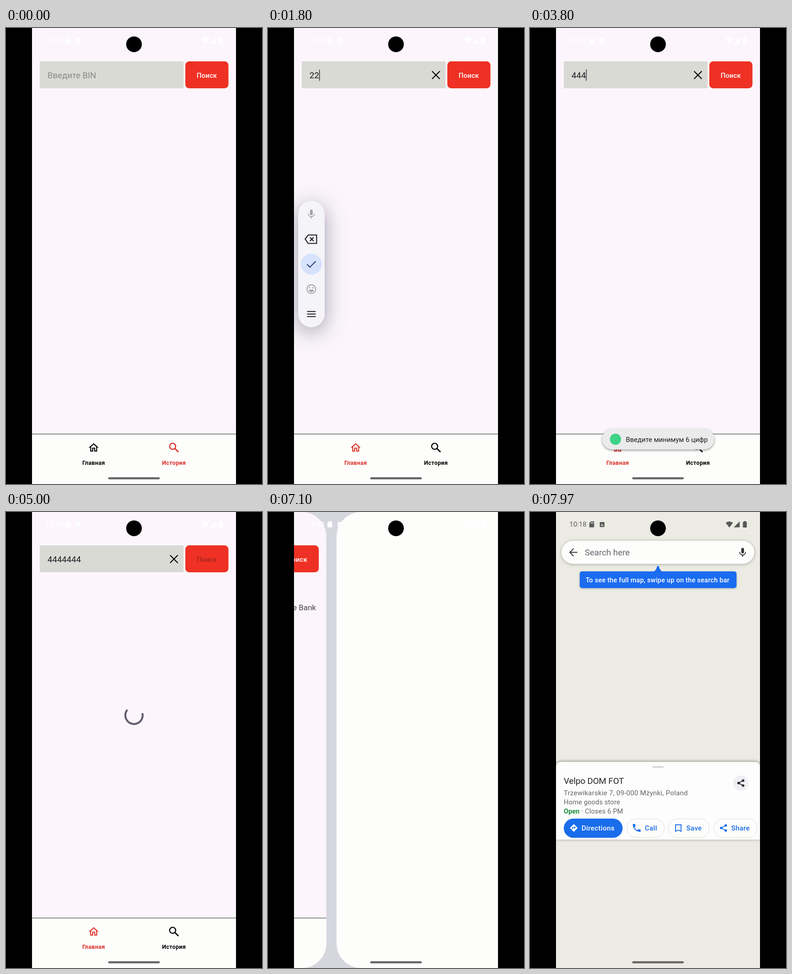
These frames come from a looping animation (561x998 px, 8000 ms). An HTML page with a canvas:

```html
<!DOCTYPE html>
<html lang="ru">
<head>
<meta charset="utf-8">
<style>
html, body { margin: 0; width: 100%; height: 100%; overflow: hidden; background: #000; }
canvas { display: block; width: 100vw; height: 100vh; }
</style>
</head>
<body>
<canvas id="stage" width="561" height="998"></canvas>
<script>
const c = document.getElementById('stage').getContext('2d');
const LOOP = 8000;
const SCREEN = { x: 57, w: 447, h: 998 };
const RED = '#ee3124', TAB_RED = '#dc3029', BLUE = '#1a6dea', INK = '#45424b';

const T = {
  homeTab: 600, toolbarIn: 950, firstDigit: 1300, secondDigit: 1550,
  toastIn: 2300, toastOut: 4300, clear: 3200, typeStart: 3450, typeStep: 140,
  load: 4650, result: 5650, slide: 6967, mapIn: 7480, sheetIn: 7680
};

const clamp = v => Math.max(0, Math.min(1, v));

// Cubic bezier segment evaluated at x by bisection.
function bezier(x, [x0, y0, x1, y1, x2, y2, x3, y3]) {
  const at = (a, b, d, e, s) =>
    a * (1 - s) ** 3 + 3 * b * s * (1 - s) ** 2 + 3 * d * s * s * (1 - s) + e * s ** 3;
  let lo = 0, hi = 1;
  for (let i = 0; i < 24; i++) {
    const mid = (lo + hi) / 2;
    if (at(x0, x1, x2, x3, mid) < x) lo = mid; else hi = mid;
  }
  return at(y0, y1, y2, y3, lo);
}
const standard = x => bezier(clamp(x), [0, 0, 0.4, 0, 0.2, 1, 1, 1]);
function emphasized(x) {
  if (x <= 0) return 0;
  if (x >= 1) return 1;
  return x < 1 / 6
    ? bezier(x, [0, 0, 0.05, 0, 0.1333, 0.06, 1 / 6, 0.4])
    : bezier(x, [1 / 6, 0.4, 0.2083, 0.82, 0.25, 1, 1, 1]);
}

function text(str, x, y, size, color, { weight = 400, spacing = 0, align = 'left' } = {}) {
  c.font = `${weight} ${size}px Roboto, sans-serif`;
  c.letterSpacing = spacing + 'px';
  c.textAlign = align;
  c.fillStyle = color;
  c.fillText(str, x, y);
}
function rect(x, y, w, h, color) {
  c.fillStyle = color;
  c.fillRect(x, y, w, h);
}
function round(x, y, w, h, r, color, border) {
  c.beginPath();
  c.roundRect(x, y, w, h, r);
  c.fillStyle = color;
  c.fill();
  if (border) {
    c.strokeStyle = border;
    c.lineWidth = 1;
    c.stroke();
  }
}
function circle(x, y, r, color) {
  c.beginPath();
  c.arc(x, y, r, 0, Math.PI * 2);
  c.fillStyle = color;
  c.fill();
}
function ring(x, y, r, color, width, from = 0, sweep = Math.PI * 2) {
  c.beginPath();
  c.arc(x, y, r, from, from + sweep);
  c.strokeStyle = color;
  c.lineWidth = width;
  c.stroke();
}
function line(points, color, width, close = false) {
  c.beginPath();
  points.forEach(([x, y]) => c.lineTo(x, y));
  if (close) c.closePath();
  c.strokeStyle = color;
  c.lineWidth = width;
  c.stroke();
}
function poly(points, color) {
  c.beginPath();
  points.forEach(([x, y]) => c.lineTo(x, y));
  c.fillStyle = color;
  c.fill();
}
function shape(d, x, y, scale, color) {
  c.save();
  c.translate(x, y);
  c.scale(scale, scale);
  c.fillStyle = color;
  c.fill(new Path2D(d));
  c.restore();
}
function shadowed(color, blur, dy, draw) {
  c.save();
  c.shadowColor = color;
  c.shadowBlur = blur;
  c.shadowOffsetY = dy;
  draw();
  c.restore();
}

const HOME = 'M12 5.69l5 4.5V18h-2v-6H9v6H7v-7.81l5-4.5M12 3L2 12h3v8h6v-6h2v6h6v-8h3z';
const PHONE = 'M6.6 10.8c1.4 2.8 3.8 5.1 6.6 6.6l2.2-2.2c.3-.3.7-.4 1-.2 1.1.4 2.3.6 3.6.6.6 0 1 .4 1 1V20c0 .6-.4 1-1 1C10.6 21 3 13.4 3 4c0-.6.4-1 1-1h3.5c.6 0 1 .4 1 1 0 1.2.2 2.4.6 3.6.1.3 0 .7-.2 1z';

function mic(x, y, color) {
  round(x - 3, y - 10, 6, 12, 3, color);
  ring(x, y - 1, 6.5, color, 1.9, 0, Math.PI);
  rect(x - 1, y + 5, 2, 4.5, color);
}
function share(x, y, color) {
  line([[x + 5, y - 5.5], [x - 5, y], [x + 5, y + 5.5]], color, 1.7);
  for (const [dx, dy] of [[5, -5.5], [-5, 0], [5, 5.5]]) circle(x + dx, y + dy, 2.7, color);
}
function magnifier(x, y, color) {
  ring(x - 2.8, y - 3, 6.6, color, 2.4);
  line([[x + 2, y + 1.8], [x + 10, y + 9.6]], color, 2.8);
}

function field(value, cursor) {
  rect(74, 73, 315, 59, '#d9dad4');
  if (value) {
    text(value, 91, 110, 18.6, '#1d1b20');
    line([[359.5, 94.5], [376.5, 111.5]], '#0a0a0a', 2.3);
    line([[376.5, 94.5], [359.5, 111.5]], '#0a0a0a', 2.3);
  } else {
    text('Введите BIN', 91, 110, 18.6, '#8b8c8a');
  }
  if (cursor) rect(91 + value.length * 10.44, 91, 2, 24.5, '#55555a');
}

function tabs(homeActive) {
  rect(57, 888, 447, 110, '#fdfdfb');
  rect(57, 888, 447, 1.2, '#48474a');
  const home = homeActive ? TAB_RED : '#000';
  const history = homeActive ? '#000' : TAB_RED;
  const style = { weight: 700, spacing: 0.3, align: 'center' };
  shape(HOME, 179, 905.3, 1.09, home);
  magnifier(368, 918.5, history);
  text('Главная', 192, 956, 12.6, home, style);
  text('История', 368, 956, 12.6, history, style);
}

function toolbar() {
  shadowed('rgba(70,70,95,.5)', 46, 10, () => round(66, 378, 58, 277, 29, '#f5f4f8'));
  const gray = '#a3a2aa', dark = '#1c1c22';
  mic(95, 407.5, gray);
  line([[81.5, 462], [88, 453], [106.5, 453], [106.5, 471.5], [88, 471.5]], dark, 2.2, true);
  line([[92, 458], [100, 466.5]], dark, 2.2);
  line([[100, 458], [92, 466.5]], dark, 2.2);
  circle(95, 517, 23, '#d6e2fc');
  line([[85.5, 517], [92, 523.5], [104.5, 510.5]], '#2a4379', 2.2);
  ring(95, 571.5, 9.6, gray, 2);
  circle(91.3, 568.5, 1.6, gray);
  circle(98.7, 568.5, 1.6, gray);
  c.beginPath();
  c.arc(95, 572.8, 5.2, 0, Math.PI);
  c.fillStyle = gray;
  c.fill();
  for (const y of [620.5, 626, 631.5]) rect(85.5, y - 1, 19, 2, dark);
}

function toast(alpha) {
  c.save();
  c.globalAlpha = alpha;
  shadowed('rgba(0,0,0,.4)', 5, 2, () => round(158, 877, 246, 45.5, 22.75, '#ebebec'));
  circle(187.3, 900, 12.2, '#3ed386');
  text('Введите минимум 6 цифр', 210, 905.5, 14.9, '#1f1f21');
  c.restore();
}

function spinner(ms) {
  const rad = Math.PI / 180, cycle = ms % 1332;
  const head = 290 * standard(cycle / 666);
  const tail = 290 * standard((cycle - 666) / 666);
  const turn = 286 * cycle / 1332 + 216 * Math.floor(ms / 1332) - 90;
  ring(280.5, 445, 19, '#625b71', 4.2, (turn + tail) * rad, Math.max(0.5, head - tail) * rad);
}

function results() {
  const bold = { weight: 700 };
  text('Тип карты:', 74, 184, 17, INK, bold);
  text('nira', 74, 215, 17, INK);
  text('Страна:', 74, 271, 17, INK, bold);
  text('Poland', 74, 302, 17, INK);
  text('(широта: 52.0, долгота:', 74, 333, 17, INK);
  text('20.0)', 74, 353, 17, INK);
  text('Банк:', 323, 184, 17, INK, bold);
  text('Sorvel Lunarine Bank', 323, 215, 17, INK);
  text('Tamira S.A.', 323, 235, 17, INK);
  text('-', 323, 266, 17, INK);
  text('-', 323, 297, 17, INK);
}

function typed(t) {
  if (t < T.clear) return '2'.repeat((t >= T.firstDigit) + (t >= T.secondDigit));
  const n = Math.floor((t - T.typeStart) / T.typeStep) + 1;
  return '4'.repeat(Math.max(0, Math.min(7, n)));
}
function cursorOn(t) {
  if (t < T.toolbarIn || t >= T.load) return false;
  const lastKey = T.typeStart + 6 * T.typeStep;
  if (t >= T.typeStart && t < lastKey) return true;
  const edits = [T.toolbarIn, T.firstDigit, T.secondDigit, T.clear, lastKey];
  const since = edits.filter(e => e <= t).pop();
  return (t - since) % 1000 < 500;
}

function app(t) {
  const loading = t >= T.load && t < T.result;
  rect(57, 0, 447, 998, '#fcf6fc');
  field(typed(t), cursorOn(t));
  round(393, 73, 94.5, 59, 8.5, RED);
  text('Поиск', 440, 108.5, 15, loading ? '#a3281f' : '#fff',
    { weight: 500, spacing: 0.1, align: 'center' });
  tabs(t >= T.homeTab);
  if (t >= T.toolbarIn && t < T.toastIn) toolbar();
  if (loading) spinner(t - T.load);
  if (t >= T.result) results();
  if (t >= T.toastIn && t < T.toastOut) {
    toast(Math.min(clamp((t - T.toastIn) / 200), clamp((T.toastOut - t) / 200)));
  }
}

function chip(x, w, label, labelX) {
  round(x + 0.5, 671.5, w - 1, 41, 20.5, '#fdfdfb', '#dcdedd');
  text(label, labelX, 697, 15.2, BLUE, { weight: 500, spacing: 0.3 });
}

function sheet() {
  shadowed('rgba(0,0,0,.4)', 7, -1, () => round(57, 547, 447, 170, [10, 10, 0, 0], '#fdfdfd'));
  round(268, 556, 25, 4, 2, '#dadada');
  text('Velpo DOM FOT', 74, 595, 18.7, '#202124');
  const gray = '#626468', small = { spacing: 0.25 };
  text('Trzewikarskie 7, 09-000 Mżynki, Poland', 74, 620, 15.1, gray, small);
  text('Home goods store', 74, 640, 14.7, gray, { spacing: 0.15 });
  text('Open', 74, 660, 14.7, '#1e8e3e', { weight: 700 });
  text('· Closes 6 PM', 112.5, 660, 14.7, gray, { spacing: 0.15 });
  circle(462, 593.3, 16.7, '#efeef4');
  share(462, 593.3, '#202124');

  round(74, 671, 129, 42, 21, BLUE);
  poly([[96, 683], [104.5, 691.5], [96, 700], [87.5, 691.5]], '#fff');
  line([[93, 694.5], [93, 690.5], [97, 690.5]], BLUE, 1.6);
  poly([[97, 687.5], [100.3, 690.5], [97, 693.5]], BLUE);
  text('Directions', 113, 697, 15.2, '#fff', { weight: 500, spacing: 0.35 });
  chip(212, 83, 'Call', 251.5);
  shape(PHONE, 222.5, 680, 0.95, BLUE);
  chip(303, 90, 'Save', 342.5);
  line([[319, 684.5], [331, 684.5], [331, 699], [325, 696], [319, 699]], BLUE, 1.9, true);
  chip(402, 96, 'Share', 441);
  share(424, 691.5, BLUE);
}

function mapPage(t) {
  if (t < T.mapIn) {
    rect(57, 0, 447, 998, '#fdfdfc');
    return;
  }
  rect(57, 0, 447, 998, '#ecebe3');
  shadowed('rgba(0,0,0,.3)', 7, 1, () => round(69, 63, 422.5, 50.5, 25.25, '#fdfdfc'));
  line([[104, 88.3], [87.5, 88.3]], '#33353a', 2);
  line([[95.5, 80], [87.3, 88.3], [95.5, 96.5]], '#33353a', 2);
  text('Search here', 120, 94.5, 18.8, '#66686c');
  mic(466, 88.5, '#33353a');
  if (t < T.sheetIn) return;

  shadowed('rgba(0,0,0,.25)', 4, 1, () => round(109, 130, 343.5, 36.5, 5, '#1b6cf1'));
  c.beginPath();
  c.moveTo(271, 130.5);
  c.quadraticCurveTo(276, 128, 278.5, 119.5);
  c.quadraticCurveTo(280.5, 115.5, 282.5, 119.5);
  c.quadraticCurveTo(285, 128, 290, 130.5);
  c.fillStyle = '#1b6cf1';
  c.fill();
  text('To see the full map, swipe up on the search bar', 122, 154, 14.6, '#fff',
    { weight: 500, spacing: 0.2 });

  c.save();
  c.translate(0, 451 * (1 - standard((t - T.sheetIn) / 250)));
  sheet();
  c.restore();
}

function statusBar(color, ground) {
  text('10:18', 86.5, 32, 14.8, color, { spacing: 0.1 });
  poly([[133.5, 20.5], [140.5, 20.5], [140.5, 33.5], [130, 33.5], [130, 24]], color);
  for (const x of [133, 135.2, 137.4]) rect(x, 22.5, 1.2, 3, ground);
  round(152.8, 22, 10.4, 11, 1.5, color);
  text('A', 158, 30.6, 8, ground, { weight: 700, align: 'center' });
  c.beginPath();
  c.moveTo(436.8, 34);
  c.lineTo(428.8, 23.8);
  c.quadraticCurveTo(436.8, 17.6, 444.8, 23.8);
  c.fillStyle = color;
  c.fill();
  poly([[459.5, 20.5], [459.5, 33.5], [446.5, 33.5]], color);
  round(466.5, 21.5, 8.6, 12.5, 1.3, color);
  rect(468.8, 20, 4, 2, color);
}

function windowAt(dx, radius, draw) {
  c.save();
  c.translate(dx, 0);
  c.beginPath();
  c.roundRect(SCREEN.x, 0, SCREEN.w, SCREEN.h, radius);
  c.clip();
  draw();
  c.restore();
}

function render(t) {
  c.clearRect(0, 0, 561, 998);
  rect(0, 0, 561, 998, '#000');
  c.save();
  c.beginPath();
  c.rect(SCREEN.x, 0, SCREEN.w, SCREEN.h);
  c.clip();

  const travel = SCREEN.w * 1.05;
  const shift = travel * emphasized((t - T.slide) / 500);
  const moving = shift > 0 && shift < travel;
  const radius = moving ? 54 : 0;
  if (moving) rect(57, 0, 447, 998, '#d6d6df');
  if (shift < travel) windowAt(-shift, radius, () => app(t));
  if (shift > 0) windowAt(travel - shift, radius, () => mapPage(t));

  const onMap = t >= T.mapIn;
  statusBar(onMap ? '#58585a' : '#fff', onMap ? '#ecebe3' : '#f4f0f5');
  circle(280.5, 35.7, 17.2, '#000');
  round(224, 983.3, 113, 4.4, 2.2, '#646464');
  c.restore();
}

const start = performance.now();
function frame() {
  render((performance.now() - start) % LOOP);
  requestAnimationFrame(frame);
}
frame();
</script>
</body>
</html>
```
